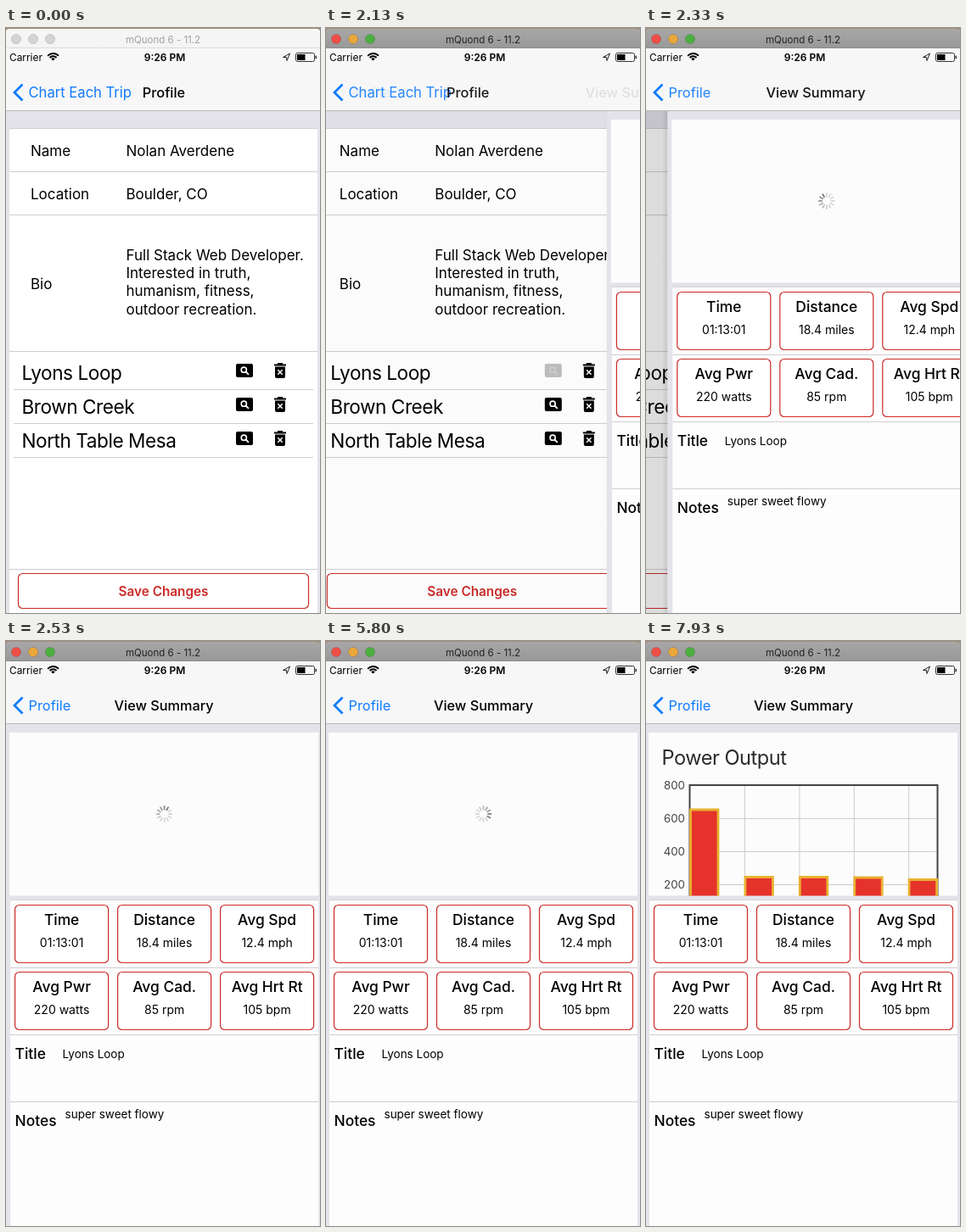
Recreate the animation shown at these times as an HTML page with a canvas. Size 370x690 px, loop 8000 ms.

```html
<!DOCTYPE html>
<html lang="en">
<head>
<meta charset="utf-8">
<title>Ride profile</title>
<style>
  html, body { margin: 0; width: 100%; height: 100%; overflow: hidden; background: #fff; }
  canvas { display: block; width: 370px; height: 690px; }
</style>
</head>
<body>
<canvas id="stage" width="370" height="690"></canvas>
<script>
const ctx = document.getElementById('stage').getContext('2d');
const W = 370, H = 690, LOOP = 8000, STEP = 1000 / 15;
const ACTIVATE = 1860, TAP = 1990, PUSH = 2106.2, CHART = 6520;
const BLUE = '#0f7bfb', RED = '#cb2b28', BACKDROP = '#e4e3ea', RULE = '#cfced2';

function rect(x, y, w, h, color) {
  ctx.fillStyle = color;
  ctx.fillRect(x, y, w, h);
}

function rounded(x, y, w, h, r, fill, stroke, width = 1.2) {
  ctx.beginPath();
  ctx.roundRect(x, y, w, h, r);
  if (fill) { ctx.fillStyle = fill; ctx.fill(); }
  if (stroke) { ctx.strokeStyle = stroke; ctx.lineWidth = width; ctx.stroke(); }
}

function path(points, color, width, close) {
  ctx.beginPath();
  points.forEach(([x, y]) => ctx.lineTo(x, y));
  if (close) ctx.closePath();
  ctx.strokeStyle = color;
  ctx.lineWidth = width;
  ctx.stroke();
}

// Display sizes are set slightly tighter than body sizes
function text(str, x, y, size, { weight = 400, color = '#000', align = 'left' } = {}) {
  ctx.font = `${weight} ${size}px Inter, Roboto, sans-serif`;
  ctx.letterSpacing = size > 20 ? `${-0.02 * size}px` : '0px';
  ctx.textAlign = align;
  ctx.fillStyle = color;
  ctx.fillText(str, x, y);
}

function faded(alpha, draw) {
  ctx.save();
  ctx.globalAlpha *= alpha;
  draw();
  ctx.restore();
}

function titleBar(active) {
  const shade = ctx.createLinearGradient(0, 1, 0, 24);
  shade.addColorStop(0, active ? '#a8a7a8' : '#f6f6f6');
  shade.addColorStop(1, active ? '#999899' : '#f4f4f4');
  rect(0, 0, W, 3, '#a98c6f');
  rounded(0, 1, W, 23, [4, 4, 0, 0], shade);
  rect(0, 23, W, 1, active ? '#8f8e8f' : '#dcdcdc');
  const lights = active ? ['#ee4e47', '#eaa73b', '#4bb03f'] : Array(3).fill('#d5d4d5');
  lights.forEach((color, i) => {
    ctx.beginPath();
    ctx.arc(12 + i * 20, 13, 5.6, 0, 7);
    ctx.fillStyle = color;
    ctx.fill();
    ctx.strokeStyle = 'rgba(0,0,0,.13)';
    ctx.lineWidth = 1;
    ctx.stroke();
  });
  text('mQuond 6 - 11.2', 185, 17.5, 11.5, { align: 'center', color: active ? '#222' : '#a3a2a3' });
}

function statusBar() {
  text('Carrier', 4, 38.5, 11.9);
  text('9:26 PM', 187, 38.5, 12, { weight: 600, align: 'center' });
  ctx.strokeStyle = '#000';
  for (const [r, width] of [[8.5, 2], [5.2, 2], [1.5, 3]]) {
    ctx.beginPath();
    ctx.arc(55.5, 38.5, r, -Math.PI * 0.77, -Math.PI * 0.23);
    ctx.lineWidth = width;
    ctx.stroke();
  }
  path([[326.5, 34.5], [334.5, 30], [331, 38.5], [330.5, 34.5]], '#222', 1, true);
  rounded(341.5, 29.5, 22, 10, 2, null, '#333', 1);
  rect(343, 31, 9.5, 7, '#000');
  rounded(364.5, 32.5, 1.5, 4, 1, '#333');
}

function navBar(p) {
  rect(0, 24, W, 73, '#f7f7f8');
  rect(0, 97, W, 1, '#b9b9bd');
  path([[19.5, 66.5], [10, 76], [19.5, 85.5]], BLUE, 2.8);
  faded(Math.max(0, 1 - 1.1 * p), () => {
    text('Chart Each Trip', 26.5, 82, 16.6, { color: BLUE });
    text('Profile', 186 - 202 * p, 82, 16.3, { weight: 500, align: 'center' });
  });
  faded(p, () => {
    text('Profile', 26.5, 82, 16.4, { color: BLUE });
    text('View Summary', 185.5 + 197 * (1 - p), 82, 16.3, { weight: 500, align: 'center' });
  });
  statusBar();
}

function searchIcon(y) {
  rounded(271, y - 8, 20, 16, 2, '#000');
  ctx.beginPath();
  ctx.arc(280.3, y - 0.8, 3.1, 0, 7);
  ctx.strokeStyle = '#fff';
  ctx.lineWidth = 1.6;
  ctx.stroke();
  path([[282.6, y + 1.5], [286, y + 4.8]], '#fff', 1.8);
}

function trashIcon(y) {
  rect(316, y - 7.5, 14, 2, '#000');
  rect(320, y - 9, 6, 2, '#000');
  rounded(317, y - 4.5, 12, 13.5, [0, 0, 2, 2], '#000');
  path([[320.3, y - 0.7], [325.7, y + 4.7]], '#fff', 1.5);
  path([[325.7, y - 0.7], [320.3, y + 4.7]], '#fff', 1.5);
}

function profilePage(tapped) {
  rect(-2, 98, W + 4, H - 98, BACKDROP);
  rect(4, 118, 363, H - 118, '#fff');
  for (const y of [118, 169, 220, 381, 638]) rect(4, y, 363, 1, RULE);

  const body = 17;
  text('Name', 29, 150.5, body);
  text('Nolan Averdene', 141.5, 150.5, body);
  text('Location', 29, 201.5, body);
  text('Boulder, CO', 141.5, 201.5, body);
  text('Bio', 29, 307.5, body);
  ['Full Stack Web Developer.', 'Interested in truth,', 'humanism, fitness,', 'outdoor recreation.']
    .forEach((row, i) => text(row, 141.5, 273.5 + i * 21.4, body));

  ['Lyons Loop', 'Brown Creek', 'North Table Mesa'].forEach((ride, i) => {
    const y = 404 + i * 40;
    text(ride, 18.5, y + 11, 22.6);
    faded(tapped && i === 0 ? 0.25 : 1, () => searchIcon(y));
    trashIcon(y);
    rect(9, y + 22, 353, 1, RULE);
  });

  rounded(14.5, 643.5, 342, 41, 5, '#fff', RED);
  text('Save Changes', 185.5, 670, 15.3, { weight: 600, align: 'center', color: RED });
}

function spinner(t) {
  const head = Math.floor(t * 12 / 1000 + 0.01) - 5;
  ctx.save();
  ctx.translate(185.5, 204);
  ctx.lineCap = 'round';
  for (let i = 0; i < 12; i++) {
    const age = ((head - i) % 12 + 12) % 12;
    const a = i * Math.PI / 6;
    const alpha = Math.max(0.2, 0.72 - age * 0.09);
    path([5.5, 9].map(r => [r * Math.sin(a), -r * Math.cos(a)]), `rgba(80,80,85,${alpha})`, 1.9);
  }
  ctx.restore();
}

function chart() {
  ctx.save();
  ctx.beginPath();
  ctx.rect(3, 108, 364, 192.5);
  ctx.clip();
  text('Power Output', 18.5, 146, 23.6, { color: '#2b2b2b' });
  for (let i = 0; i < 4; i++) {
    const y = 170 + i * 39;
    text(800 - i * 200, 46, y + 5, 13.3, { align: 'right', color: '#444' });
    rect(52, y, 291, 1, '#cdcdcd');
    rect(116 + i * 64.4, 170, 1, 135, '#cdcdcd');
  }
  ctx.strokeStyle = '#444';
  ctx.lineWidth = 2;
  ctx.strokeRect(51.5, 170, 292, 170);
  [199, 278.5, 278.5, 279, 281.5].forEach((top, i) =>
    rounded(52.5 + i * 64.4, top, 32.5, 340 - top, 0, '#e5332b', '#e9b130', 2.8));
  ctx.restore();
}

function summaryPage(t) {
  rect(-2, 98, W + 6, H - 98, BACKDROP);
  rect(3, 108, 364, 192.5, '#fcfcfc');
  rect(4, 306, 363, H - 306, '#fdfdfd');
  if (t >= CHART) chart(); else spinner(t);
  rect(4, 305, 363, 1, '#d6d5da');
  for (const y of [385, 464, 543]) rect(4, y, 363, 1, RULE);

  [['Time', '01:13:01'], ['Distance', '18.4 miles'], ['Avg Spd', '12.4 mph'],
   ['Avg Pwr', '220 watts'], ['Avg Cad.', '85 rpm'], ['Avg Hrt Rt', '105 bpm']]
    .forEach(([label, value], i) => {
      const x = 9.5 + (i % 3) * 121, y = 311.5 + Math.floor(i / 3) * 79;
      rounded(x, y, 110, 68, 5, '#fff', RED);
      text(label, x + 55, y + 23.5, 17.4, { weight: 500, align: 'center' });
      text(value, x + 55, y + 49.5, 14, { align: 'center' });
    });

  text('Title', 9.5, 492.5, 17.4, { weight: 500 });
  text('Lyons Loop', 65.5, 492, 13.5);
  text('Notes', 9.5, 571.5, 17.4, { weight: 500 });
  text('super sweet flowy', 68.5, 562.5, 13.5);
}

// Critically damped spring of the page push
function pushProgress(t) {
  const x = Math.max(0, t - PUSH) * 0.01875;
  const p = 1 - (1 + x) * Math.exp(-x);
  return p > 0.998 ? 1 : p;
}

function shifted(dx, draw) {
  ctx.save();
  ctx.translate(dx, 0);
  draw();
  ctx.restore();
}

function render(t) {
  const p = pushProgress(t);
  rect(0, 0, W, H, BACKDROP);
  if (p < 1) {
    shifted(-112 * p ** 0.9, () => profilePage(t >= TAP));
    rect(0, 98, W, H - 98, `rgba(0,0,0,${0.15 * p})`);
  }
  if (p > 0) {
    shifted(367 * (1 - p), () => {
      if (p < 1) {
        const shadow = ctx.createLinearGradient(-9, 0, -2, 0);
        shadow.addColorStop(0, 'rgba(0,0,0,0)');
        shadow.addColorStop(1, `rgba(0,0,0,${0.1 * p})`);
        rect(-9, 98, 7, H - 98, shadow);
      }
      summaryPage(t);
    });
  }
  navBar(p);
  titleBar(t >= ACTIVATE);
}

const start = performance.now();
function tick() {
  const t = (performance.now() - start) % LOOP;
  render(Math.floor((t + 5) / STEP) % 120 * STEP);
  requestAnimationFrame(tick);
}
tick();
</script>
</body>
</html>
```
